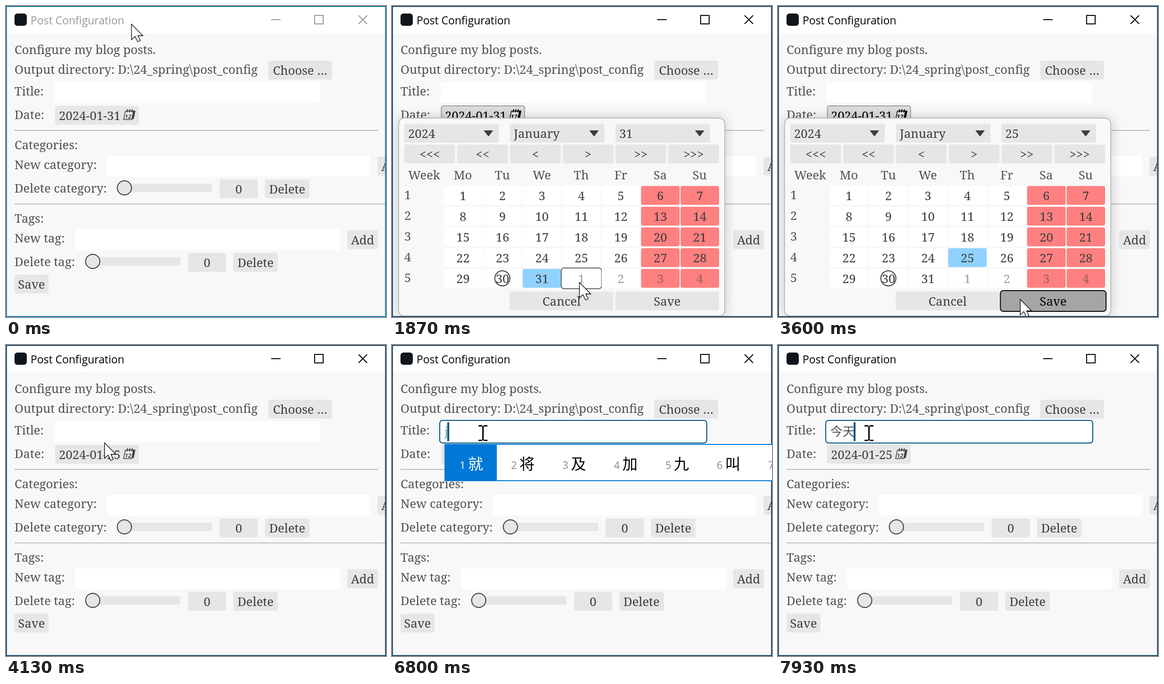
Animation, 804 px wide and 660 px high, one loop 8000 ms. Source, as an HTML page with a canvas:

```html
<!DOCTYPE html>
<html lang="en">
<head>
<meta charset="utf-8">
<title>Post Configuration</title>
<style>
html, body { margin: 0; width: 100%; height: 100%; overflow: hidden; background: #f8f8f8; }
canvas { display: block; }
</style>
</head>
<body>
<canvas id="stage" width="804" height="660"></canvas>
<script>
const ctx = document.getElementById('stage').getContext('2d');
const LOOP = 8000, TICK = 200 / 3;
const SERIF = '25.6px "Noto Serif", "Noto Sans CJK SC", "Noto Sans CJK", serif';
const SANS = '"Open Sans", "Noto Sans", sans-serif';
const HAN = '"Noto Sans CJK SC", "Noto Sans CJK", sans-serif';
const INK = '#3c3c3c', LABEL = '#505050', FACE = '#e6e6e6', FOCUS = '#00537d';

// Pointer path: time, x, y
const PATH = [
  [0, 265, 38], [200, 264, 60], [467, 250, 150], [667, 238, 212], [800, 233, 228],
  [1200, 233, 228], [1400, 262, 300], [1667, 360, 500], [1867, 396, 586],
  [1933, 397, 585], [2067, 398, 572], [2333, 396, 540], [2600, 394, 531],
  [2933, 391, 534], [3000, 391, 534], [3267, 440, 572], [3533, 512, 622],
  [3600, 512, 622], [3667, 510, 618], [3867, 300, 325], [4067, 215, 215],
  [4267, 194, 190], [4333, 192, 187]
];

// Title field: time, text, candidates while composing
const TYPING = [
  [0, ''], [4725, 'h'], [4995, 'hw'], [5325, 'h'], [5460, ''],
  [6795, 'j', '就 将 及 加 九 叫 级'],
  [6995, 'ji', '及 几 级 机 即 记 寄'],
  [7195, 'jin', '进 金 今 近 仅 紧 尽'],
  [7395, "jin't", '今天 金条 今 进 金 近'],
  [7525, "jin'ti", '今天 金条 紧贴 今 进 金'],
  [7660, "jin'tia", '今天 今 进 金 近 仅'],
  [7725, "jin'tian", '今天 金田 今 进 金 近'],
  [7925, '今天']
];

let now, mouse, pressed, popup;

const between = (a, b) => now >= a && now < b;
const inside = (x, y, w, h) => mouse.x >= x && mouse.x < x + w && mouse.y >= y && mouse.y < y + h;

function pointer(t) {
  let i = 0;
  while (i < PATH.length - 1 && PATH[i + 1][0] <= t) i++;
  const a = PATH[i], b = PATH[i + 1] || a;
  const k = a === b ? 0 : (t - a[0]) / (b[0] - a[0]);
  return { x: Math.round(a[1] + (b[1] - a[1]) * k), y: Math.round(a[2] + (b[2] - a[2]) * k) };
}

function rect(x, y, w, h, color) {
  ctx.fillStyle = color;
  ctx.fillRect(x, y, w, h);
}

function box(x, y, w, h, r, fill, stroke) {
  ctx.beginPath();
  ctx.roundRect(x, y, w, h, r);
  if (fill) { ctx.fillStyle = fill; ctx.fill(); }
  if (stroke) { ctx.strokeStyle = stroke; ctx.lineWidth = 2; ctx.stroke(); }
}

// Outline that stands out around a widget
function halo(x, y, w, h, fill, stroke) {
  box(x - 2, y - 2, w + 4, h + 4, 6, fill, stroke);
}

function text(s, x, y, color = LABEL, align = 'left', font = SERIF) {
  ctx.font = font;
  ctx.fillStyle = color;
  ctx.textAlign = align;
  ctx.fillText(s, x, y);
}

function line(color, ...pts) {
  ctx.beginPath();
  for (let i = 0; i < pts.length; i += 4) {
    ctx.moveTo(pts[i], pts[i + 1]);
    ctx.lineTo(pts[i + 2], pts[i + 3]);
  }
  ctx.strokeStyle = color;
  ctx.lineWidth = 2;
  ctx.stroke();
}

function polygon(pts) {
  ctx.beginPath();
  pts.forEach(([x, y]) => ctx.lineTo(x, y));
  ctx.closePath();
}

function ring(x, y, r, fill) {
  ctx.beginPath();
  ctx.arc(x, y, r, 0, 7);
  if (fill) { ctx.fillStyle = fill; ctx.fill(); }
  ctx.strokeStyle = INK;
  ctx.lineWidth = 2;
  ctx.stroke();
}

function button(x, y, w, h, label, { fill, left, dim, live = !popup, open } = {}) {
  const over = live && inside(x, y, w, h), down = over && pressed;
  if (open) box(x + 0.5, y, w - 1, h, 4, '#dcdcdc', '#a0a0a0');
  else if (over) halo(x, y, w, h, down ? '#a5a5a5' : fill || '#dcdcdc', down ? '#000' : '#696969');
  else box(x, y, w, h, 4, fill || FACE);
  const color = dim ? 'rgba(60,60,60,.5)' : over || open ? '#000' : INK;
  text(label, left ? x + 8 : x + w / 2, y + 30, color, left ? 'left' : 'center');
}

function field(x, y, w, focused) {
  const over = !popup && inside(x, y, w, 44);
  if (focused || over) halo(x, y, w, 44, '#fff', focused ? FOCUS : '#696969');
  else box(x, y, w, 44, 4, '#fff');
}

function slider(x, y) {
  box(x, y - 9, 200, 18, 4, FACE);
  ring(x + 14.5, y, 15, FACE);
}

function calendarIcon(x, y, color) {
  ctx.save();
  ctx.transform(1, 0, -0.2, 1, x, y);
  box(-4, -9, 16, 18, 1, color);
  ctx.strokeStyle = color;
  ctx.lineWidth = 1.6;
  ctx.fillStyle = '#f0f0f0';
  ctx.fillRect(-9, -8, 17, 18);
  ctx.strokeRect(-9, -8, 17, 18);
  line(color, -5, -12, -5, -5, 0, -12, 0, -5, 5, -12, 5, -5);
  text('12', -1, 8, color, 'center', 'bold 12px ' + SANS);
  ctx.restore();
}

function titleBar(active) {
  const color = active ? '#000' : '#999';
  rect(0, 0, 804, 58, '#fff');
  box(18, 16, 26, 26, 6, '#10171c');
  text('Post Configuration', 52, 39, color, 'left', '22.9px ' + SANS);
  line(color, 561, 29, 581, 29, 746, 20, 764, 38, 764, 20, 746, 38);
  ctx.strokeRect(653, 20, 18, 18);
}

function form(focused, saved) {
  const labels = [
    ['Configure my blog posts.', 102], ['Output directory: D:\\24_spring\\post_config', 144],
    ['Title:', 190], ['Date:', 240], ['Categories:', 304], ['New category:', 346],
    ['Delete category:', 396], ['Tags:', 460], ['New tag:', 502], ['Delete tag:', 552]
  ];
  labels.forEach(([s, y]) => text(s, 18, y));
  button(555, 116, 135, 40, 'Choose …');
  field(103, 162, 561, focused);
  button(104, 212, 177, 40, saved ? '2024-01-25' : '2024-01-31', { left: true, open: popup });
  calendarIcon(260, 231, popup ? '#000' : INK);
  line('#bebebe', 18, 264, 787, 264, 18, 420, 804, 420);
  field(213, 318, 557);
  button(786, 320, 65, 40, 'Add');
  slider(236, 386);
  button(452, 368, 81, 40, '0');
  button(548, 368, 94, 40, 'Delete');
  field(146, 474, 561);
  button(722, 476, 65, 40, 'Add');
  slider(169, 542);
  button(385, 524, 81, 40, '0');
  button(481, 524, 94, 40, 'Delete');
  button(18, 570, 72, 40, 'Save');
}

function datePicker(day) {
  const live = true;
  ctx.save();
  ctx.shadowColor = 'rgba(0,0,0,.22)';
  ctx.shadowBlur = 26;
  box(14, 238, 690, 420, 12, '#f8f8f8');
  ctx.restore();
  box(14, 238, 690, 420, 12, '#f8f8f8', '#bebebe');

  ['2024', 'January', String(day)].forEach((s, i) => {
    const x = 26 + 223.5 * i;
    button(x, 250, 200, 40, s, { left: true, live });
    polygon([[x + 168, 264], [x + 188, 264], [x + 178, 277]]);
    ctx.fillStyle = INK;
    ctx.fill();
  });
  ['<<<', '<<', '<', '>', '>>', '>>>'].forEach((s, i) =>
    button(26 + 111.7 * i, 294, 107.5, 40, s, { live }));

  text('Week', 68, 368, LABEL, 'center');
  ['Mo', 'Tu', 'We', 'Th', 'Fr', 'Sa', 'Su'].forEach((s, i) =>
    text(s, 150 + 83.5 * i, 368, LABEL, 'center'));
  for (let i = 0; i < 35; i++) {
    const col = i % 7, row = (i - col) / 7, y = 382 + 44 * row;
    if (!col) text(row + 1, 26, y + 28);
    const fill = i + 1 === day ? '#90d1ff' : col > 4 ? '#ff8080' : '#fff';
    button(109.5 + 83.5 * col, y, 81.5, 40, i % 31 + 1, { fill, live, dim: i > 30 });
  }
  ring(233.5, 578, 16);
  button(249, 606, 219.5, 40, 'Cancel', { live });
  button(472.5, 606, 219.5, 40, 'Save', { live });
}

function candidates(list, hint) {
  box(112, 211, 720, 77, 0, '#fff', '#0078d7');
  let x = 113;
  list.split(' ').forEach((s, i) => {
    const w = 76.8 + 32 * s.length;
    if (!i) rect(111, 210, w + 2, 79, '#0078d7');
    text(i + 1, x + 30, 263, i ? '#888' : '#fff', 'left', '22px ' + SANS);
    text(s, x + 48, 264, i ? '#000' : '#fff', 'left', '32px ' + HAN);
    x += w;
  });
  if (hint) {
    box(112, 288, 720, 47, 0, '#fff', '#0078d7');
    text('按 Tab 键筛选', 143, 320, '#888', 'left', '22px ' + HAN);
  }
}

function entry() {
  const [, s, list] = TYPING.findLast(e => e[0] <= now);
  text(s, 111, 193, list ? '#6ba3bd' : LABEL);
  const w = ctx.measureText(s).width;
  rect(Math.round(109 + w), 164, 4, 40, FOCUS);
  if (list) candidates(list, between(7195, 7725));
}

function arrow() {
  const { x, y } = mouse;
  polygon([[0, 0], [0, 33], [7.5, 26], [13, 37.5], [18.5, 35], [13.5, 24.5], [24, 24.5]]
    .map(p => [p[0] + x + 0.5, p[1] + y + 0.5]));
  ctx.fillStyle = '#fff';
  ctx.fill();
  ctx.strokeStyle = '#000';
  ctx.lineWidth = 1.3;
  ctx.stroke();
}

function beam() {
  const { x, y } = mouse;
  const bars = [[-9, -17, 8, 3], [2, -17, 8, 3], [-1, -15, 3, 30], [-9, 14, 8, 3], [2, 14, 8, 3]];
  bars.forEach(([a, b, w, h]) => rect(x + a - 1, y + b - 1, w + 2, h + 2, '#fff'));
  bars.forEach(([a, b, w, h]) => rect(x + a, y + b, w, h, '#000'));
}

function draw(t) {
  now = Math.floor((t + 4) / TICK) * TICK;
  mouse = pointer(now);
  popup = between(930, 3660);
  pressed = between(860, 930) || between(2595, 2660) || between(3595, 3660);
  const active = now >= 860, focused = now >= 4395;

  rect(0, 0, 804, 660, '#f8f8f8');
  titleBar(active);
  form(focused, now >= 3660);
  if (popup) datePicker(now < 2660 ? 31 : 25);
  ctx.strokeStyle = active ? '#1c4a6a' : '#1c7db4';
  ctx.lineWidth = 2;
  ctx.strokeRect(1, 1, 802, 658);
  if (focused) entry();
  if (!popup && inside(103, 162, 561, 44)) beam();
  else arrow();
}

const start = performance.now();
function loop() {
  draw((performance.now() - start) % LOOP);
  requestAnimationFrame(loop);
}
loop();
</script>
</body>
</html>
```
